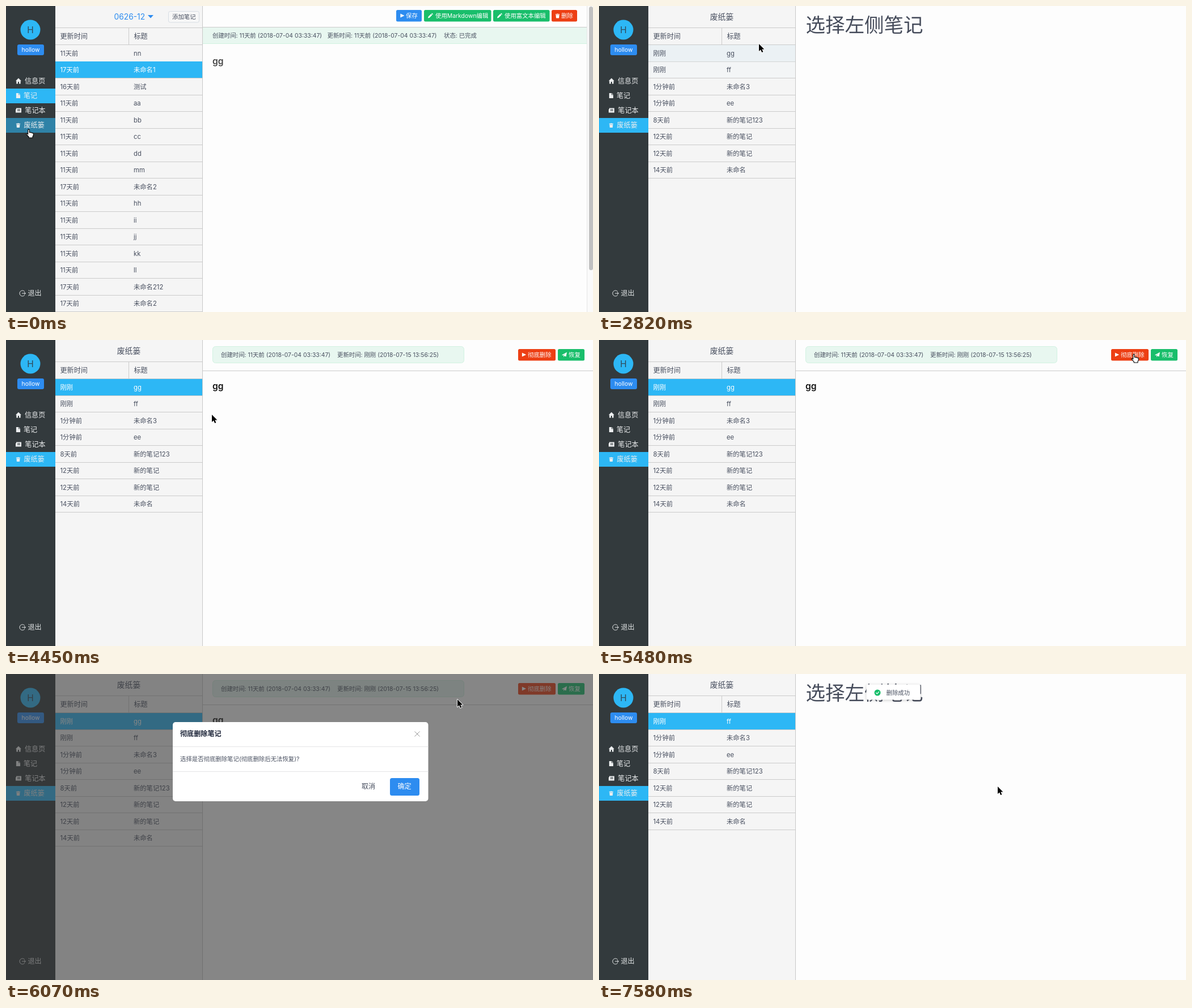
An HTML page with a canvas for the animation above (8 s loop, 1035 by 541 pixels).

```html
<!DOCTYPE html>
<html lang="zh-CN">
<head>
<meta charset="utf-8">
<title>废纸篓</title>
<style>
html, body { margin: 0; width: 100%; height: 100%; overflow: hidden; background: #fdfdfd; }
canvas { display: block; }
</style>
</head>
<body>
<canvas id="stage" width="1035" height="541"></canvas>
<script>
const c = document.getElementById('stage').getContext('2d');
const LOOP = 8000, STEP = 148.1;
const CYAN = '#2db7f5', BLUE = '#2d8cf0', GREEN = '#19be6b', RED = '#ed3f14', INK = '#495060', LINE = '#cbcbcb';
const TOP = 68.5, ROW = 29.5;

// Moments of the story, in ms
const LEAVE = 1180, SELECT = 3480, DETAIL = 4140, ASK = 5640, CONFIRM = 6880, REMOVED = 7100, TOAST = 7240;

const icons = {
  home: 'M5 0L10 5H8.7V10H6V6.5H4V10H1.3V5H0Z',
  doc: 'M1 0H5.5V3.5H9V10H1ZM6.3 0L9 2.7H6.3Z',
  book: 'M1 1H10V9H0V3H1ZM3 3H8V4H3ZM3 5H8V6H3Z',
  trash: 'M1 2H4V1H6V2H9V3.2H1ZM1.6 4H8.4L7.8 10H2.2Z',
  play: 'M1 1L9 5L1 9Z',
  pen: 'M0 10L.8 7L6 1.8L8.2 4L3 9.2ZM6.8 1L8 0L10 2L9 3.2Z',
  plane: 'M0 5.5L10 0L8.3 9L5 7.3L3.5 10V6.5L8 2L2.5 6.3Z'
};
const arrow = new Path2D('M0 0V13L3 10.2L5.2 15L7.4 14L5.3 9.5H9.4Z');
const hand = new Path2D('M-1.3 1Q0-.8 1.3 1V5.5L3 5.3L4 6L5.6 5.8L6.3 6.7Q8.3 6.3 8.3 8V10.5L7 13V15H.2V13.3L-4 8.8Q-4.4 7-2.6 7.6L-1.3 9Z');

const notes = [
  '11天前 nn', '17天前 未命名1', '16天前 测试', '11天前 aa', '11天前 bb', '11天前 cc', '11天前 dd', '11天前 mm',
  '17天前 未命名2', '11天前 hh', '11天前 ii', '11天前 jj', '11天前 kk', '11天前 ll', '17天前 未命名212', '17天前 未命名2'
];
const trashed = [
  '刚刚 gg', '刚刚 ff', '1分钟前 未命名3', '1分钟前 ee', '8天前 新的笔记123',
  '12天前 新的笔记', '12天前 新的笔记', '14天前 未命名'
];
// Pointer path: time, x, y
const path = [
  [0, 40, 218], [590, 52, 211], [1632, 52, 211], [1780, 36, 226], [1930, 24, 246], [2080, 110, 282], [2230, 170, 258],
  [2380, 215, 215], [2670, 272, 100], [2814, 282, 67], [3260, 284, 86], [3560, 284, 86], [3850, 274, 110],
  [4000, 274, 110], [4443, 363, 132], [4600, 450, 148], [4740, 560, 145], [4890, 720, 112],
  [5190, 915, 42], [5340, 943, 25], [5776, 943, 25], [6072, 796, 45], [6368, 716, 166], [6550, 703, 199], [LOOP, 703, 199]
];

const clamp = v => Math.max(0, Math.min(1, v));
const ramp = (t, start, length) => clamp((t - start) / length);
const easeOut = k => 1 - (1 - k) ** 2.3;

function pointer(t) {
  const i = Math.max(1, path.findIndex(p => p[0] >= t));
  const [a, b] = [path[i - 1], path[i]], k = ramp(t, a[0], b[0] - a[0]);
  return [a[1] + (b[1] - a[1]) * k, a[2] + (b[2] - a[2]) * k];
}
function text(s, x, y, size, color = INK, weight = 400, align = 'left') {
  c.font = `${weight} ${size}px Inter, "Noto Sans CJK SC", "Noto Sans CJK", sans-serif`;
  c.textAlign = align;
  c.fillStyle = color;
  c.fillText(s, x, y + size * .37);
}
function box(x, y, w, h, fill, radius = 0, border) {
  c.beginPath();
  c.roundRect(x, y, w, h, radius);
  c.fillStyle = fill;
  c.fill();
  if (border) { c.strokeStyle = border; c.lineWidth = 1; c.stroke(); }
}
function icon(name, x, y, size, color = '#fff') {
  c.save();
  c.translate(x, y - size / 2);
  c.scale(size / 10, size / 10);
  c.fillStyle = color;
  c.fill(new Path2D(icons[name]), 'evenodd');
  c.restore();
}
function disc(x, y, r, fill) {
  c.beginPath();
  c.arc(x, y, r, 0, 7);
  c.fillStyle = fill;
  c.fill();
}
function stroke(d, color, width = 1) {
  c.strokeStyle = color;
  c.lineWidth = width;
  c.stroke(new Path2D(d));
}
function button(x, y, w, fill, name, label, iconX, textX) {
  box(x, y, w, 20.5, fill, 2.5);
  icon(name, iconX, y + 10, 9);
  text(label, textX, y + 10, 10.4, '#fff');
}
function faded(alpha, draw) {
  if (alpha <= 0) return;
  c.save();
  c.globalAlpha = alpha;
  draw();
  c.restore();
}

function sidebar(t) {
  box(0, 0, 87, 541, '#333a3d');
  disc(43, 42, 17.5, CYAN);
  text('H', 43, 42, 15.5, '#304a5a', 400, 'center');
  box(20, 68, 47, 19, BLUE, 3);
  text('hollow', 43.5, 77, 10.4, '#fff', 400, 'center');
  faded(1 - easeOut(ramp(t, LEAVE, 300)), () => box(0, 146, 87, 26, CYAN));
  faded(clamp(.58 + t / 400), () => box(0, 198, 87, 26, CYAN));
  [['home', '信息页', 33], ['doc', '笔记', 31], ['book', '笔记本', 33.3], ['trash', '废纸篓', 31.5]].forEach(([name, label, x], i) => {
    const y = 132.5 + 26 * i;
    icon(name, 17, y, i % 2 ? 9 : 10, '#eceeef');
    text(label, x, y, 12.1, '#eceeef');
  });
  stroke('M33 505A5 5 0 1 0 33 511M28 508H34.5M32 506L34.5 508L32 510', '#dfe2e3');
  text('退出', 38.5, 508, 12.1, '#dfe2e3');
}

// Share of the last 150 ms that the pointer spent on a row
function hover(t, row) {
  return [0, 50, 100, 150].filter(d => {
    const [x, y] = pointer(t - d);
    return x > 87 && x < 346 && Math.floor((y + 3 - TOP) / ROW) === row;
  }).length / 4;
}

function table(rows, selected, strength, t) {
  box(87, 0, 259, 541, '#f5f5f5');
  rows.forEach((row, i) => {
    const y = TOP + ROW * i, [when, title] = row.split(' ');
    const on = i === selected ? strength : 0;
    const color = on > .5 ? '#fff' : INK;
    if (t < SELECT) faded(hover(t, i), () => box(87, y, 259, ROW, '#e9f1f5'));
    faded(on, () => box(87, y, 259, ROW, CYAN));
    text(when, 95.5, y + 15, 11.3, color);
    text(title, 225, y + 15, 11.3, color);
    box(87, Math.round(y + ROW - .5), 259, 1, LINE);
  });
  box(87, 38, 259, 1, LINE);
  box(87, 68, 259, 1, LINE);
  box(216, 38, 1, 30, LINE);
  text('更新时间', 95.5, 54, 12.1);
  text('标题', 225.5, 54, 12.1);
  box(346, 0, 1, 541, '#c8c8c8');
}

function notesPage(t) {
  table(notes, 1, 1, t);
  text('0626-12', 190.5, 18.5, 13.8, BLUE);
  c.fillStyle = BLUE;
  c.fill(new Path2D('M250 16H260L255 21.5Z'));
  box(286.5, 9.5, 54, 19.5, '#f7f7f7', 3, '#d7dde4');
  text('添加笔记', 293, 19, 10.4);
  button(688, 7, 45, BLUE, 'play', '保存', 694.5, 705);
  button(737, 7, 118.5, GREEN, 'pen', '使用Markdown编辑', 744, 757);
  button(859, 7, 99.5, GREEN, 'pen', '使用富文本编辑', 866, 879);
  button(962, 7, 45, RED, 'trash', '删除', 968, 979);
  box(347, 37, 678, 30, '#e8f7f0');
  box(347, 37, 678, 1, LINE);
  box(347, 66, 678, 1, '#d1f2e1');
  text('创建时间: 11天前 (2018-07-04 03:33:47)', 364, 52, 10.4);
  text('更新时间: 11天前 (2018-07-04 03:33:47)', 566.5, 52, 10.4);
  text('状态: 已完成', 772, 52, 10.4);
  text('gg', 364, 97, 15.6, '#444', 600);
  box(1025, 0, 10, 541, '#fafafa');
  box(1024, 0, 1, 541, '#e6e6e6');
  box(1028, 1, 7, 466, '#c1c1c1', 3.5);
}

function trashPage(t) {
  const removed = t >= REMOVED;
  table(removed ? trashed.slice(1) : trashed, 0, ramp(t, SELECT, 250), t);
  text('废纸篓', 216.5, 18.5, 13.8, INK, 400, 'center');
  if (t < DETAIL || removed) {
    text('选择左侧笔记', 364.5, 33, 34.5, '#464c5b');
    return;
  }
  box(364.5, 11.5, 443, 29, '#e8f7f0', 5, '#d1f2e1');
  text('创建时间: 11天前 (2018-07-04 03:33:47)', 379, 26, 10.4);
  text('更新时间: 刚刚 (2018-07-15 13:56:25)', 584, 26, 10.4);
  button(903, 16, 66, RED, 'play', '彻底删除', 909, 920);
  button(973, 16, 47, GREEN, 'plane', '恢复', 980, 992);
  box(347, 54, 688, 1, LINE);
  text('gg', 364, 81, 15.6, '#111', 600);
}

function dialog(alpha, scale) {
  faded(alpha, () => {
    c.translate(519, 155);
    c.scale(scale, scale);
    c.translate(-519, -155);
    box(294, 85, 450.5, 140, '#fff', 5);
    text('彻底删除笔记', 307, 106, 12.1, '#1c2438', 700);
    stroke('M720.5 101.5L729.5 110.5M729.5 101.5L720.5 110.5', '#999');
    box(294, 128, 450.5, 1, '#e4e5e7');
    text('选择是否彻底删除笔记(彻底删除后无法恢复)?', 307, 150.5, 10.4);
    box(294, 172, 450.5, 1, '#e4e5e7');
    text('取消', 627, 198.5, 12.1);
    box(677, 184, 52, 31, BLUE, 3.5);
    text('确定', 690.5, 198.5, 12.1, '#fff');
  });
}

function toast(k) {
  faded(k, () => {
    c.translate(0, -18 * (1 - k));
    c.save();
    c.shadowColor = 'rgba(0,0,0,.2)';
    c.shadowBlur = 5;
    c.shadowOffsetY = 1;
    box(471.5, 18.5, 95, 27, '#fff', 3);
    c.restore();
    disc(491, 33, 5.5, GREEN);
    stroke('M488.3 33L490.4 35L493.8 31.2', '#fff', 1.2);
    text('删除成功', 506.5, 33, 10.4);
  });
}

function cursor(t) {
  const [x, y] = pointer(t);
  const onMenu = x < 87 && y < 224;
  const onDelete = t < ASK && x > 903 && x < 969 && y < 37;
  const onConfirm = t > ASK && t < CONFIRM && x < 729 && y > 184;
  c.save();
  c.translate(x, y);
  c.lineJoin = 'round';
  if (onMenu || onDelete || onConfirm) {
    c.fillStyle = '#fff';
    c.fill(hand);
    c.strokeStyle = '#000';
    c.lineWidth = 1.1;
    c.stroke(hand);
  } else {
    c.strokeStyle = '#fff';
    c.lineWidth = 1.8;
    c.stroke(arrow);
    c.fillStyle = '#000';
    c.fill(arrow);
  }
  c.restore();
}

function draw(t) {
  box(0, 0, 1035, 541, '#fdfdfd');
  if (t < LEAVE) notesPage(t);
  else trashPage(t);
  sidebar(t);
  const open = ramp(t, ASK, 280), close = ramp(t, CONFIRM, 300);
  faded(open ** 1.5 * (1 - close), () => box(0, 0, 1035, 541, 'rgba(55,55,55,.6)'));
  dialog(open ** .8 * (1 - close), 1 - .19 * (1 - open) ** 2 - .1 * close);
  toast(ramp(t, TOAST, 300));
  cursor(t);
}

function frame(now) {
  draw(Math.floor((now % LOOP + 12) / STEP) * STEP);
  requestAnimationFrame(frame);
}
requestAnimationFrame(frame);
</script>
</body>
</html>
```
